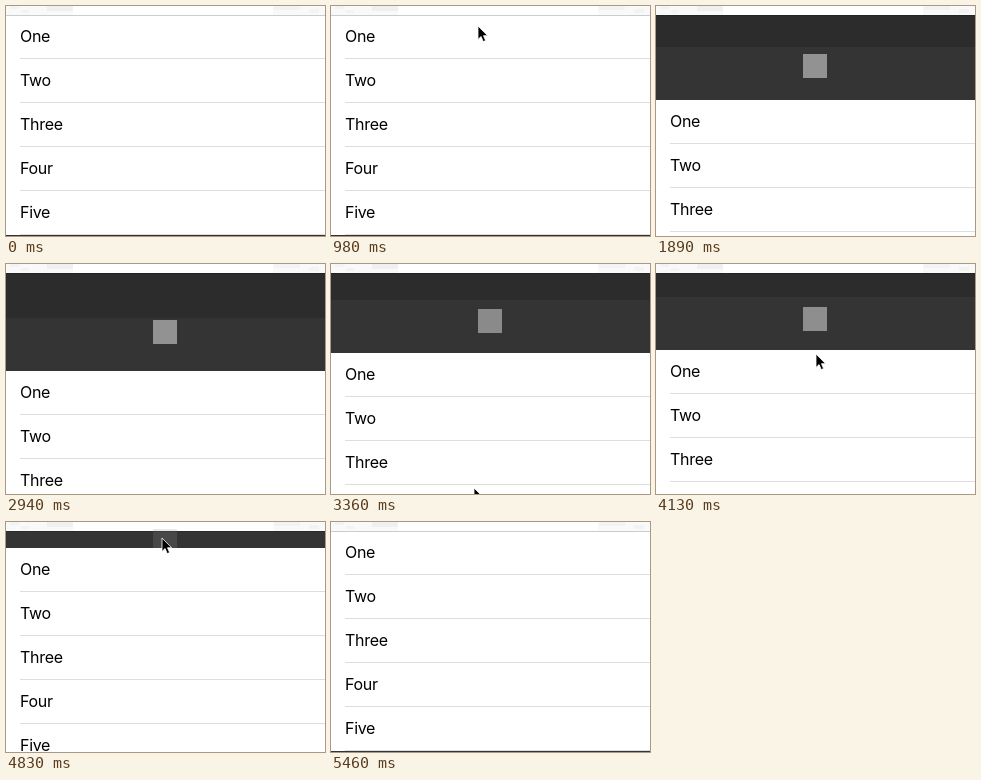
Animation, 319 px wide and 230 px high, one loop 5880 ms. Source, as an HTML page:

```html
<!DOCTYPE html>
<html lang="en">
<head>
<meta charset="utf-8">
<title>Pull to refresh</title>
<style>
html, body { margin: 0; width: 100%; height: 100%; overflow: hidden; background: #fff; }
svg { display: block; }
text { font: 16px Inter, "Liberation Sans", sans-serif; letter-spacing: -.3px; }
</style>
</head>
<body>
<svg width="319" height="230" viewBox="0 0 319 230">
  <rect width="319" height="9" fill="#f9f9f9"/>
  <rect x="67" width="200" height="9" fill="#fff"/>
  <rect x="41" width="26" height="5" fill="#f0f0f0"/>
  <path d="M4 0h9v3h-9zM15 4h8v3h-8zM268 0h26v4h-26zM303 3h10v4h-10z" fill="#f3f3f3"/>
  <rect y="9" width="319" height="221" fill="#2c2c2c"/>
  <rect id="panel" width="319" height="53" fill="#343434"/>
  <rect id="mark" x="147" width="24" height="24" fill="#929292"/>
  <g id="list"><rect y="9" width="319" height="220" fill="#fff"/></g>
  <rect y="229" width="319" height="1" id="foot" fill="#333"/>
  <rect y="9" width="319" height="1" fill-opacity=".2"/>
  <path id="cursor" d="M0 0V13.4L3.1 10.5 5.2 15.6 7.6 14.6 5.5 9.7H9.6Z" stroke="#fff" stroke-width=".8"/>
</svg>
<script>
const LOOP = 5880, STEP = 70, TOP = 9, HOLD = 80;
const el = id => document.getElementById(id);
const [panel, mark, list, foot, cursor] = ["panel", "mark", "list", "foot", "cursor"].map(el);

["One", "Two", "Three", "Four", "Five"].forEach((word, i) => {
  const y = 36 + 44 * i;
  list.innerHTML += `<text x="14" y="${y}">${word}</text>
    <rect x="14" y="${y + 16}" width="305" height="1" fill="#dedede"/>`;
});

// Straight interpolation through [time, value...] points
function along(points, t) {
  const i = points.findIndex(p => p[0] > t);
  if (i < 0) return points.at(-1).slice(1);
  if (i === 0) return points[0].slice(1);
  const a = points[i - 1], b = points[i], k = (t - a[0]) / (b[0] - a[0]);
  return a.slice(1).map((v, j) => v + (b[j + 1] - v) * k);
}

// cubic-bezier(.42, 0, .58, 1)
function easeInOut(x) {
  let lo = 0, hi = 1;
  for (let i = 0; i < 20; i++) {
    const s = (lo + hi) / 2;
    const bx = 1.26 * s * (1 - s) ** 2 + 1.74 * s * s * (1 - s) + s ** 3;
    if (bx < x) lo = s; else hi = s;
  }
  return lo * lo * (3 - 2 * lo);
}

const clamp = v => Math.min(1, Math.max(0, v));
const DRAG = [[1330, 0], [1470, 14], [1680, 60], [1890, 85], [2240, 98]];
const ENTER = [[350, 155, -18], [420, 153, -8], [560, 149, 12], [700, 147, 19],
  [910, 147, 19], [980, 147, 20], [1120, 143, 32]];
const LEAVE = [[4000, 163, 240], [4130, 160, 90], [4480, 157, 38], [4830, 156, 16],
  [5180, 155, 6], [5390, 154, -15], [5460, 154, -20]];

function pull(t) {
  if (t < 2940) return along(DRAG, t)[0];
  if (t < 3955) return HOLD + 18 * (1 - clamp((t - 2940) / 300)) ** 2;
  return HOLD * (1 - easeInOut(clamp((t - 3955) / 1286)));
}

function pointer(t, d) {
  if (t >= 4000) return along(LEAVE, t);
  const [x, y] = along(ENTER, t);
  return [x, y + 2.4 * d];
}

function draw(now) {
  const t = Math.floor(now % LOOP / STEP) * STEP;
  const d = Math.round(pull(t));
  list.setAttribute("transform", `translate(0 ${d})`);
  foot.setAttribute("y", 229 + d);
  panel.setAttribute("y", Math.max(TOP, TOP + d - 53));
  mark.setAttribute("y", Math.round(TOP + d * .6 - 12));
  const loading = t >= 2940 && t < 3955;
  const pulse = loading ? .85 + .15 * Math.cos((t - 2940) / 508 * 2 * Math.PI) : 1;
  mark.setAttribute("opacity", clamp(d / HOLD) * pulse);
  cursor.setAttribute("transform", `translate(${pointer(t, d).map(Math.round)})`);
}

const start = performance.now();
function tick() {
  draw(performance.now() - start);
  requestAnimationFrame(tick);
}
tick();
</script>
</body>
</html>
```
